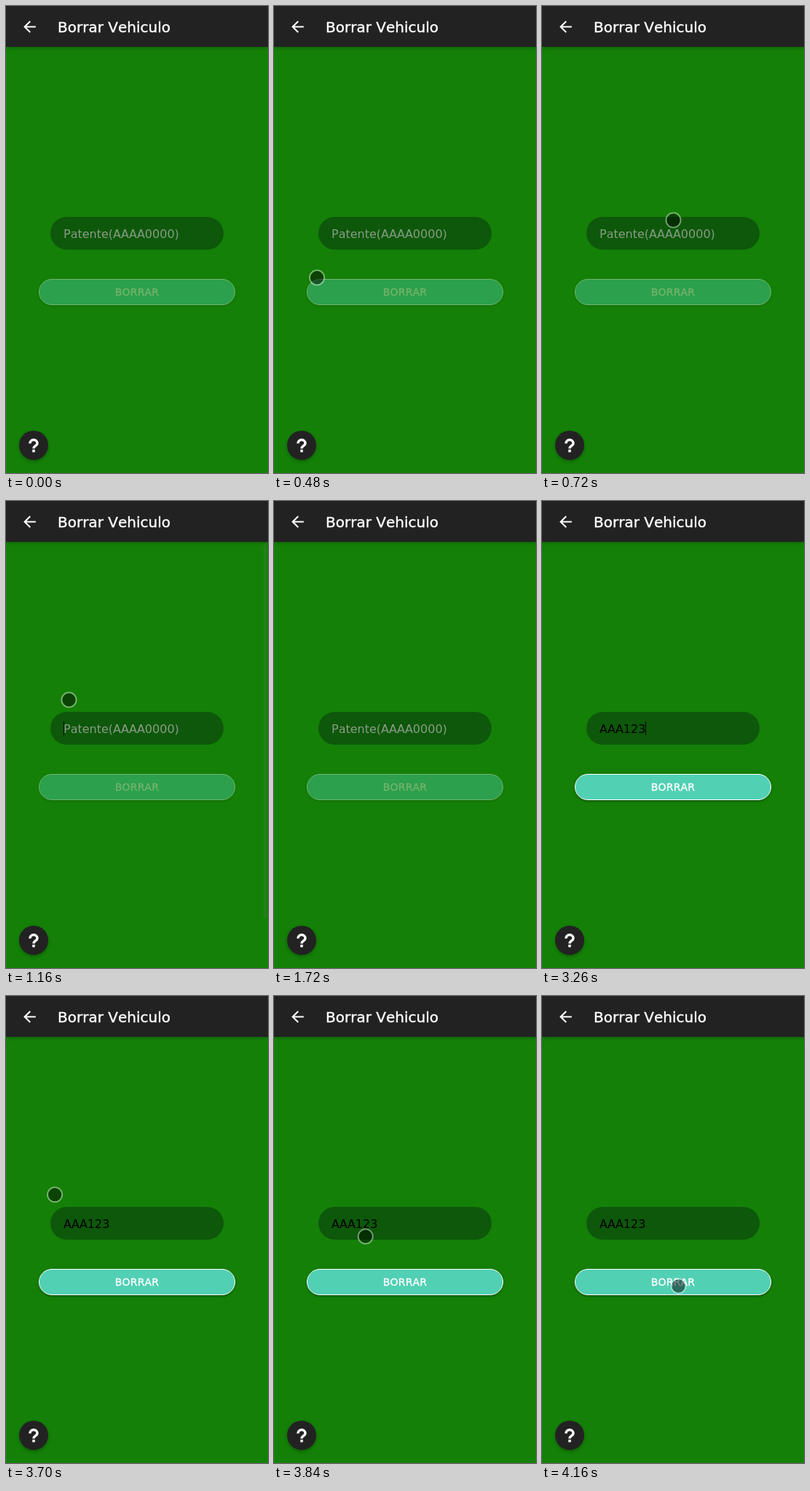
These frames come from a looping animation (360 px wide and 640 px high, 4.18 s). An HTML page with a canvas:

```html
<!DOCTYPE html>
<html lang="es">
<head>
<meta charset="utf-8">
<title>Borrar Vehiculo</title>
<style>
  html, body { margin: 0; width: 100%; height: 100%; overflow: hidden; background: #148008; }
  body { position: relative; font-family: "DejaVu Sans", sans-serif; font-kerning: none; }
  body > * { position: absolute; box-sizing: border-box; white-space: pre; }
  header { left: 0; top: 0; width: 360px; height: 56px; background: #222; color: #fff;
    font-size: 20px; line-height: 58px; padding-left: 71px; -webkit-text-stroke: .4px;
    box-shadow: 0 2px 4px -1px rgba(0,0,0,.2), 0 1px 6px rgba(0,0,0,.12); }
  header svg { position: absolute; left: 20px; top: 15.5px; fill: #fff; }
  #field { left: 61px; top: 289px; width: 238px; height: 45px; border-radius: 23px;
    background: #0d580a; padding-left: 18px; font-size: 16px; line-height: 48px; }
  #field.empty { color: #8a9b87; }
  #caret { top: 302px; width: 1px; height: 19px; background: #000; }
  #button { left: 45px; top: 374px; width: 270px; height: 36px; border: 1px solid #fff;
    border-radius: 18px; background: #52d0b4; color: #fff; text-align: center;
    font-size: 14px; line-height: 35px; letter-spacing: .2px; -webkit-text-stroke: .35px;
    box-shadow: 0 3px 1px -2px rgba(0,0,0,.2), 0 2px 2px rgba(0,0,0,.14), 0 1px 5px rgba(0,0,0,.12); }
  #help { left: 18px; top: 582px; width: 40px; height: 40px; border-radius: 50%; background: #222;
    box-shadow: 0 3px 5px -1px rgba(0,0,0,.22), 0 1px 4px rgba(0,0,0,.12); }
  #help path { fill: none; stroke: #fff; stroke-width: 3.5; }
  #bar { left: 354px; top: 58px; width: 4px; height: 514px; background: #808080; }
  canvas { left: 0; top: 0; }
</style>
</head>
<body>
<header><svg width="25" height="25" viewBox="0 0 24 24"><path d="M20 11H7.83l5.59-5.59L12 4l-8 8 8 8 1.41-1.41L7.83 13H20z"/></svg>Borrar Vehiculo</header>
<div id="field"><span id="text"></span></div>
<div id="caret"></div>
<div id="button">BORRAR</div>
<div id="help"><svg width="40" height="40"><path d="M15 17.5A5 4.9 0 0 1 25 17.5C25 20.6 20 20.8 20 24.4M20 26V29.5"/></svg></div>
<div id="bar"></div>
<canvas id="touch" width="360" height="640"></canvas>
<script>
const LOOP = 4180, STEP = 20, BLINK = 260, KEY_GAP = 80;
const FOCUS = 940, BLUR = 3540, BAR_END = 1220;
const $ = id => document.getElementById(id);
const field = $('field'), text = $('text'), caret = $('caret');
const button = $('button'), bar = $('bar'), ctx = $('touch').getContext('2d');

const linear = u => u;
const easeIn = u => u * u;
const easeOut = u => 1 - (1 - u) ** 1.3;

// Pointer strokes as cubic Béziers
const strokes = [
  { start: 160, end: 720, ease: linear, path: [[356, 153], [-35, 250], [20, 540], [180.5, 293.5]] },
  { start: 720, end: 1160, ease: easeIn, path: [[180.5, 293.5], [180, 308], [125, 295], [86.5, 272.5]] },
  { start: 1160, end: 1300, ease: linear, path: [[86.5, 272.5], [40, 238], [5, 236], [-25, 234]] },
  { start: 3540, end: 4060, hold: LOOP, ease: easeOut, path: [[0, 219], [50, 250], [130, 330], [187.5, 397.5]] }
];
const bursts = [{ start: 2040, keys: 'AAA' }, { start: 2580, keys: '123' }];

function bezier([a, b, c, d], u) {
  const v = 1 - u;
  return [0, 1].map(i =>
    v ** 3 * a[i] + 3 * v * v * u * b[i] + 3 * v * u * u * c[i] + u ** 3 * d[i]);
}

function drawTouch(t) {
  ctx.clearRect(0, 0, 360, 640);
  const s = strokes.find(s => t >= s.start && t < (s.hold || s.end));
  if (!s) return;
  const u = Math.min(1, (t - s.start) / (s.end - s.start));
  const [x, y] = bezier(s.path, s.ease(u));
  ctx.beginPath();
  ctx.arc(x, y, 9.2, 0, 2 * Math.PI);
  ctx.fillStyle = 'rgba(0,0,0,.48)';
  ctx.fill();
  ctx.beginPath();
  ctx.arc(x, y, 10.1, 0, 2 * Math.PI);
  ctx.lineWidth = 1.9;
  ctx.strokeStyle = 'rgba(255,255,255,.42)';
  ctx.stroke();
}

// Typed value and the time of the last keystroke
function typing(t) {
  let value = '', last = FOCUS;
  for (const { start, keys } of bursts) {
    if (t < start) break;
    const count = Math.min(keys.length, Math.floor((t - start) / KEY_GAP) + 1);
    value += keys.slice(0, count);
    last = start + (count - 1) * KEY_GAP;
  }
  return { value, last };
}

function draw(t) {
  const { value, last } = typing(t);
  field.className = value ? '' : 'empty';
  text.textContent = value || 'Patente(AAAA0000)';
  button.style.opacity = value ? 1 : 0.4;

  const on = t >= last && t < BLUR && Math.floor((t - last) / BLINK) % 2 === 0;
  caret.style.visibility = on ? 'visible' : 'hidden';
  caret.style.left = Math.round(79 + (value ? text.getBoundingClientRect().width : 0)) + 'px';

  const fade = Math.max(0, Math.min(1, (BAR_END - t) / 160));
  bar.style.opacity = t >= FOCUS ? 0.4 * fade : 0;
  drawTouch(t);
}

function tick(now) {
  draw(Math.floor(now % LOOP / STEP) * STEP);
  requestAnimationFrame(tick);
}
draw(0);
requestAnimationFrame(tick);
</script>
</body>
</html>
```
